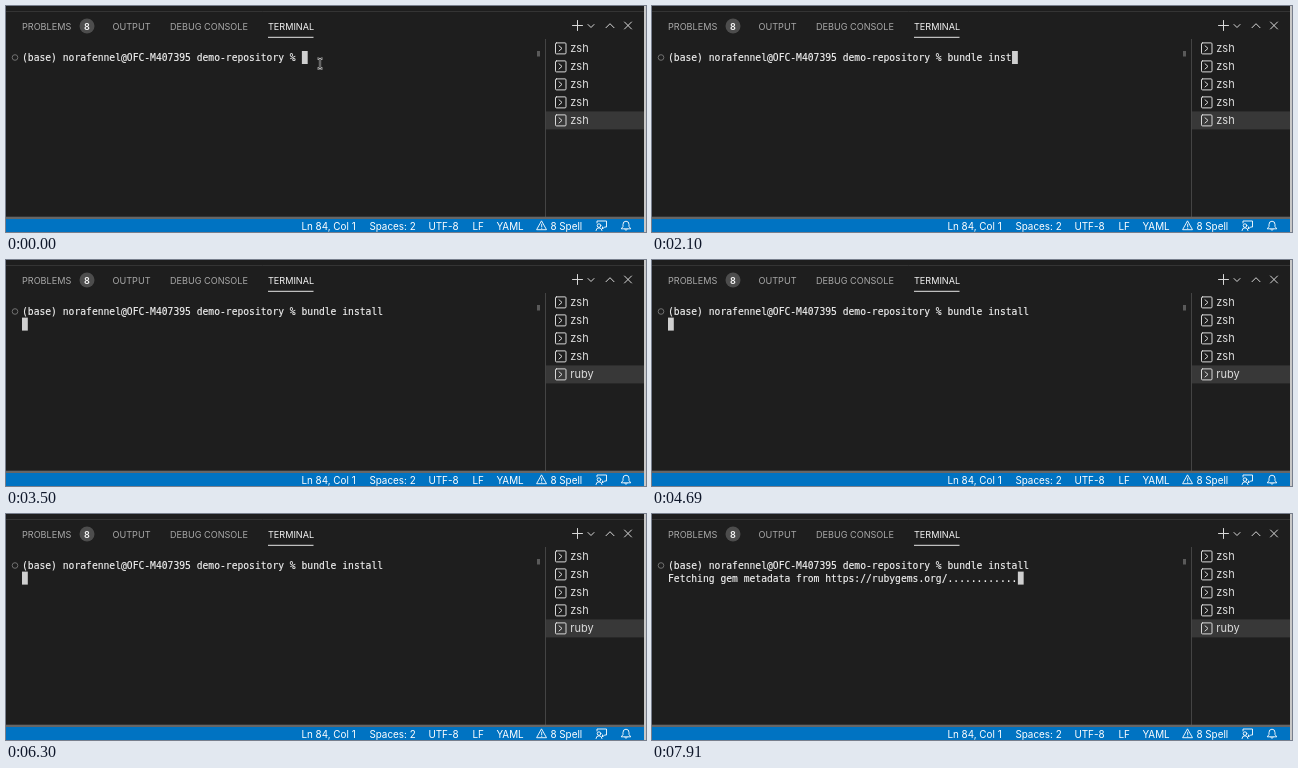
Recreate the animation shown at these times as an HTML page. Size 640x226 px, loop 8 s.

```html
<!DOCTYPE html>
<html lang="en">
<head>
<meta charset="utf-8">
<title>Terminal</title>
<style>
  html, body { margin: 0; width: 100%; height: 100%; overflow: hidden; background: #1e1e1e; }
  svg { display: block; width: 100%; height: 100%; }
  text { font-family: Inter, sans-serif; white-space: pre; }
  .line { font: 9.685px "DejaVu Sans Mono", monospace; fill: #f2f2f2; stroke: #f2f2f2; stroke-width: .15; }
  .tab { font-size: 9.1px; fill: #a8a8a8; }
  .on { fill: #f4f4f4; }
  .shell { font-size: 11px; fill: #dcdcdc; }
  .status { font-size: 9.9px; fill: #fff; }
  .icon { fill: none; stroke: #d8d8d8; stroke-linecap: round; stroke-linejoin: round; }
  .white { stroke: #fff; stroke-width: .9; }
</style>
</head>
<body>
<svg viewBox="0 0 640 226">
  <defs>
    <path id="beam" d="M311.5 52.5Q314 52.5 314 54V61Q314 62.5 311.5 62.5M316.5 52.5Q314 52.5 314 54V61Q314 62.5 316.5 62.5"/>
  </defs>
  <rect width="640" height="226" fill="#1e1e1e"/>
  <path d="M0 5.5H638" stroke="#343434"/>

  <text class="tab" x="16" y="23.7">PROBLEMS</text>
  <circle cx="81" cy="20" r="7.5" fill="#4d4d4d"/>
  <text class="tab on" x="81" y="23.5" text-anchor="middle" font-weight="600">8</text>
  <text class="tab" x="106.5" y="23.7">OUTPUT</text>
  <text class="tab" x="164" y="23.7">DEBUG CONSOLE</text>
  <text class="tab on" x="262" y="23.7">TERMINAL</text>
  <path d="M262 31.3H307.5" stroke="#e7e7e7"/>
  <path class="icon" d="M566.5 19.5H576.5M571.5 14.5V24.5M582 18.5L585 21.5L588 18.5M600 21.7L604 17.7L608 21.7M618.5 16L625.5 23M625.5 16L618.5 23"/>

  <path d="M539.5 33V211" stroke="#444"/>
  <rect x="531" y="45" width="3" height="5.5" fill="#5a5a5a"/>
  <rect x="540" y="105.4" width="98" height="18" fill="#383838"/>
  <g id="shells"></g>

  <circle cx="9" cy="51.5" r="2.8" fill="none" stroke="#707070"/>
  <text class="line" id="command" x="16" y="54.9"></text>
  <text class="line" id="output" x="16" y="67.8"></text>
  <rect id="cursor" width="5.8" height="13" fill="#cfcfcf"/>
  <g id="pointer" fill="none">
    <use href="#beam" stroke="#e0e0e0" stroke-width="2.2"/>
    <use href="#beam" stroke="#222" stroke-width=".8"/>
  </g>

  <rect y="210.7" width="638" height="2.5" fill="#666"/>
  <rect y="213" width="638" height="13" fill="#0073c2"/>
  <text class="status" x="295.4" y="223.6">Ln 84, Col 1</text>
  <text class="status" x="363.4" y="223.6">Spaces: 2</text>
  <text class="status" x="422.4" y="223.6">UTF-8</text>
  <text class="status" x="466.4" y="223.6">LF</text>
  <text class="status" x="490.4" y="223.6">YAML</text>
  <text class="status" x="544.4" y="223.6">8 Spell</text>
  <path class="icon white" d="M535.7 215.2L540.5 223.7H531ZM535.7 218.2V220.8M535.7 222.2V222.4"/>
  <path class="icon white" d="M591 217V215H600.5V221H598.5L596.5 223V221M590 224.5Q590.2 221.8 593 221.8T596 224.5"/>
  <circle class="icon white" cx="593" cy="219.6" r="1.8"/>
  <path class="icon white" d="M615.5 222.5L617 220.5V218.5A3 3.3 0 0 1 623 218.5V220.5L624.5 222.5ZM618.7 223.5Q620 225.3 621.3 223.5"/>
  <rect x="638" width="2" height="226" fill="#c8c8c8"/>
</svg>
<script>
const LOOP = 8000, LEFT = 16, CELL = 5.831;
const PROMPT = "(base) norafennel@OFC-M407395 demo-repository % ";
const COMMAND = "bundle install";
const FETCH = "Fetching gem metadata from https://rubygems.org/";
const keyTimes = [560, 770, 980, 1120, 1190, 1330, 1400, 1540, 1680, 1890, 2100, 2240, 2380, 2450];
const dotTimes = [6790, 7000, 7280, 7350, 7490, 7560, 7700, 7770, 7770, 7840, 7910, 7910];
const ENTER = 2590, RUBY = 2800, FETCHING = 6580;

const get = id => document.getElementById(id);
const command = get("command"), output = get("output");
const cursor = get("cursor"), pointer = get("pointer");

get("shells").innerHTML = [42.4, 60.4, 78.4, 96.4, 114.4].map(y => `
  <rect class="icon" x="549.5" y="${y - 5.5}" width="10.5" height="11" rx="1"/>
  <path class="icon" d="M553 ${y - 2.6}L556 ${y}L553 ${y + 2.6}"/>
  <text class="shell" x="564.3" y="${y + 3.9}">zsh</text>`).join("");
const activeShell = get("shells").lastElementChild;

const countPassed = (times, t) => times.filter(time => time <= t).length;

function draw(t) {
  const typed = PROMPT + COMMAND.slice(0, countPassed(keyTimes, t));
  const printed = t < FETCHING ? "" : FETCH + ".".repeat(countPassed(dotTimes, t));
  const entered = t >= ENTER;
  command.textContent = typed;
  output.textContent = printed;
  cursor.setAttribute("x", LEFT + CELL * (entered ? printed : typed).length);
  cursor.setAttribute("y", entered ? 57.6 : 45);
  pointer.setAttribute("visibility", t < keyTimes[0] ? "visible" : "hidden");
  activeShell.textContent = t < RUBY ? "zsh" : "ruby";
}

const start = performance.now();
function tick() {
  draw((performance.now() - start) % LOOP);
  requestAnimationFrame(tick);
}
tick();
</script>
</body>
</html>
```
